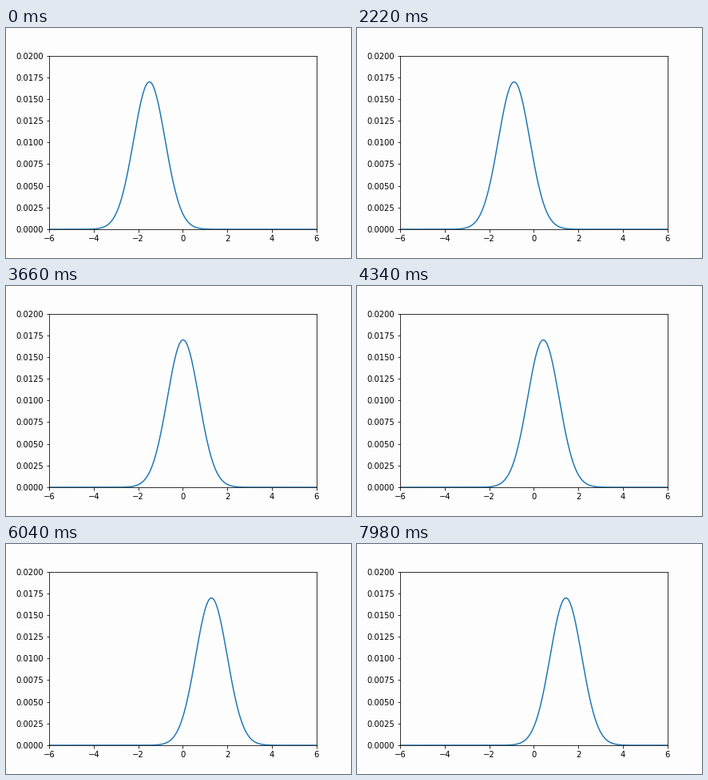
A matplotlib script that plays this animation: 432 px wide and 288 px high, repeating every 8000 ms.

```python
import numpy as np
import matplotlib.pyplot as plt
from matplotlib.animation import FuncAnimation

TICK_MS = 20
LOOP_MS = 8000
START = -1.5           # packet centre at rest
PHASE_STEP = 0.02      # oscillator phase per simulation step
STEP_IN_BEAT = (0, 1, 1, 1, 1, 1, 2)   # three steps per 140 ms beat, the second held
PAPER = "#fdfdfd"
BLUE = "#1f77b4"

plt.rcParams.update({"font.family": "DejaVu Sans", "font.size": 10})

fig, ax = plt.subplots(figsize=(6, 4), dpi=72, facecolor=PAPER)
fig.subplots_adjust(left=0.125, right=0.9, bottom=0.125, top=0.88)
ax.set_facecolor(PAPER)
ax.set_xlim(-6, 6)
ax.set_ylim(0, 0.02)
ax.set_xticks(np.arange(-6, 7, 2))
ax.set_yticks(np.linspace(0, 0.02, 9))

x = np.linspace(-6, 6, 400)
dx = x[1] - x[0]


def density(step):
    """Probability per grid cell of a coherent state in a harmonic well."""
    centre = START * np.cos(PHASE_STEP * step)
    return dx / np.sqrt(np.pi) * np.exp(-(x - centre) ** 2)


line, = ax.plot(x, density(0), color=BLUE, lw=1.5)


def update(tick):
    beat, part = divmod(tick, len(STEP_IN_BEAT))
    line.set_ydata(density(3 * beat + STEP_IN_BEAT[part]))
    return line,


anim = FuncAnimation(fig, update, frames=LOOP_MS // TICK_MS,
                     interval=TICK_MS, repeat=True, repeat_delay=0)
plt.show()
```
